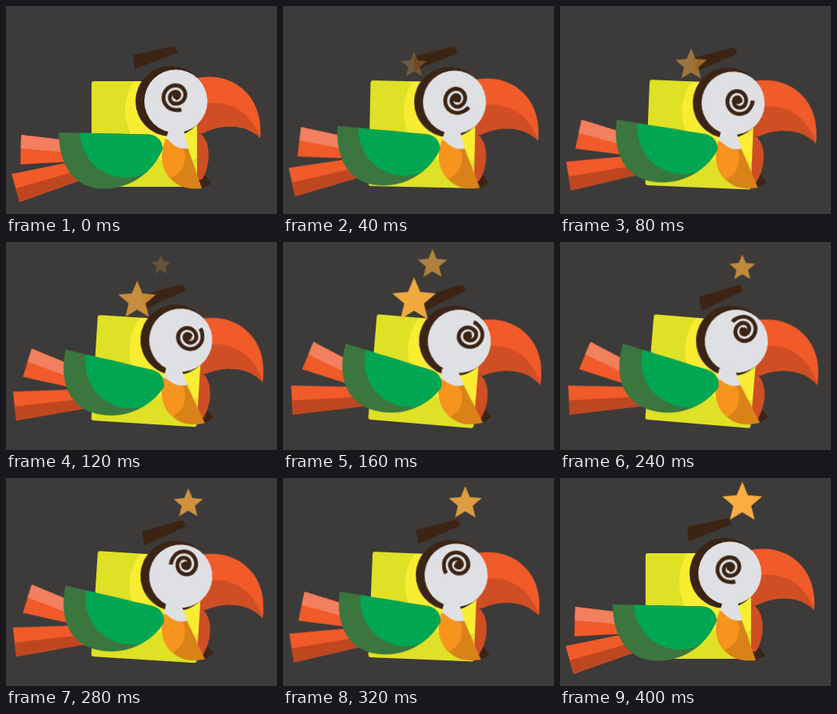
Animation of 339 by 260 pixels, one loop 440 ms. Source, as an HTML page without scripts:

```html
<!DOCTYPE html>
<html lang="en">
<head>
<meta charset="utf-8">
<title>Dizzy parrot</title>
<style>
  html, body { margin: 0; width: 100%; height: 100%; overflow: hidden; background: #3c3b3a; }
  svg { display: block; width: 100vw; height: 100vh; }

  /* Every part swings to --to and back in ten 40 ms steps, then rests for one. */
  .sway { animation: sway 440ms steps(5) infinite; }
  @keyframes sway {
    0%, 90.9%, 100% { transform: none; }
    45.44% { transform: var(--to); }
  }
  .body       { --to: translate(6px, 2px) rotate(6deg); transform-origin: 173px 160px; }
  .brow       { --to: translate(17px, 4px) rotate(-6deg); transform-origin: 211px 50px; }
  .wing       { --to: translate(2.5px, 5px) rotate(20deg); transform-origin: 196px 178px; }
  .chest      { --to: translate(-3px, 4px) rotate(-10deg); transform-origin: 211px 172px; }
  .tail-upper { --to: rotate(26deg); transform-origin: 127px 195px; }
  .tail-lower { --to: rotate(16deg); transform-origin: 145px 209px; }

  .spiral { transform-origin: 218px 110px; animation: spin 440ms steps(10) infinite; }
  @keyframes spin {
    0% { transform: rotate(8deg); }
    90.9%, 100% { transform: rotate(-352deg); }
  }

  .star { fill: #fbae40; opacity: 0; animation: 440ms step-end infinite; }
  .first { animation-name: first; }
  .second { animation-name: second; }
  .third { animation-name: third; }
  @keyframes first {
    0%, 45.44%, 100% { opacity: 0; transform: translate(164px, 73px) scale(.6); }
    9.08% { opacity: .28; transform: translate(164px, 74px) scale(.65); animation-timing-function: steps(3); }
    36.35% { opacity: .95; transform: translate(164px, 73px) scale(1.11); }
  }
  @keyframes second {
    0%, 54.53%, 100% { opacity: 0; transform: translate(180px, 27px) scale(1); }
    27.26% { opacity: .22; transform: translate(194px, 29px) scale(.49); animation-timing-function: steps(2); }
    45.44% { opacity: 1; transform: translate(180px, 27px) scale(1); }
  }
  @keyframes third {
    0% { opacity: 0; transform: translate(228px, 33px) scale(.5); }
    45.44% { opacity: .62; transform: translate(228px, 33px) scale(.57); animation-timing-function: steps(5); }
    90.9%, 100% { opacity: 1; transform: translate(228px, 31px) scale(1.01); }
  }
</style>
</head>
<body>
<svg viewBox="0 0 339 260" preserveAspectRatio="none">
  <defs>
    <path id="star" d="M0-26 6.9-9.5 24.7-8 11.1 3.6 15.3 21 0 11.7-15.3 21-11.1 3.6-24.7-8-6.9-9.5Z"/>
    <path id="wing" d="M66 158 178 160.500Q194 162 196 178C185 206 158 228.500 122 228.500C86 228.500 66 200 66 158Z"/>
    <path id="chest" d="M200 166C192 185 194 205 207 217C218 228 230 229 245 228L227 176Z"/>
    <path id="beak" d="M236 91C277 80 323 107 318 165C301 148 273 146 246 159L236 160Z"/>
    <rect id="torso" x="107" y="94" width="132" height="132" rx="3"/>
    <clipPath id="in-wing"><use href="#wing"/></clipPath>
    <clipPath id="in-chest"><use href="#chest"/></clipPath>
    <clipPath id="in-beak"><use href="#beak"/></clipPath>
    <clipPath id="in-torso"><use href="#torso"/></clipPath>
  </defs>

  <g class="sway tail-upper">
    <path fill="#f15a29" d="M19 161 110 172V193L18 198Z"/>
    <path fill="#f27f5e" d="M19 161 110 172V186L18.500 178Z"/>
  </g>
  <g class="sway tail-lower">
    <path fill="#f15a29" d="M7 210 105 190 110 212 17 245Z"/>
    <path fill="#bf4720" d="M12 228 107 201 110 212 17 245Z"/>
  </g>

  <path class="sway chest" fill="#3c2415" d="M250 212 256.500 222.500 243 229 236 218Z"/>

  <g class="sway body">
    <path fill="#d04e24" d="M236 160H244C257 172 256 200 245 217H236Z"/>
    <use href="#beak" fill="#f15a29"/>
    <path fill="#d04e24" clip-path="url(#in-beak)" d="M236 126C265 114 302 122 319 166L246 162H236Z"/>
    <use href="#torso" fill="#dee126"/>
    <circle cx="214" cy="130" r="65" fill="#f9ed32" clip-path="url(#in-torso)"/>
  </g>

  <g class="sway chest">
    <use href="#chest" fill="#d98218"/>
    <circle cx="196" cy="189" r="28" fill="#f7941e" clip-path="url(#in-chest)"/>
  </g>

  <g class="sway body">
    <circle cx="206" cy="119" r="44" fill="#3c2415"/>
    <circle cx="212.500" cy="119" r="39.500" fill="#dfe0e3"/>
    <g class="spiral">
      <path fill="none" stroke="#3c2415" stroke-width="4.800"
        d="M213 116A4 4 0 0 0 213 108A7.500 7.500 0 0 0 213 123A11.500 11.500 0 0 0 213 100A15.300 15.300 0 0 0 213 130.600Q218 131 222 129"/>
      <circle cx="213" cy="113" r="4" fill="#3c2415"/>
    </g>
  </g>

  <path class="sway chest" fill="#dfe0e3" d="M204 154 200 166C206 167 209 180 228 178L222 154Z"/>
  <path class="sway brow" fill="#3c2415" d="M159 61 211 50 215 58 161 79Z"/>

  <g class="sway wing">
    <use href="#wing" fill="#3b763e"/>
    <circle cx="150" cy="157" r="57.500" fill="#00a651" clip-path="url(#in-wing)"/>
  </g>

  <use href="#star" class="star first"/>
  <use href="#star" class="star second"/>
  <use href="#star" class="star third"/>
</svg>
</body>
</html>
```
